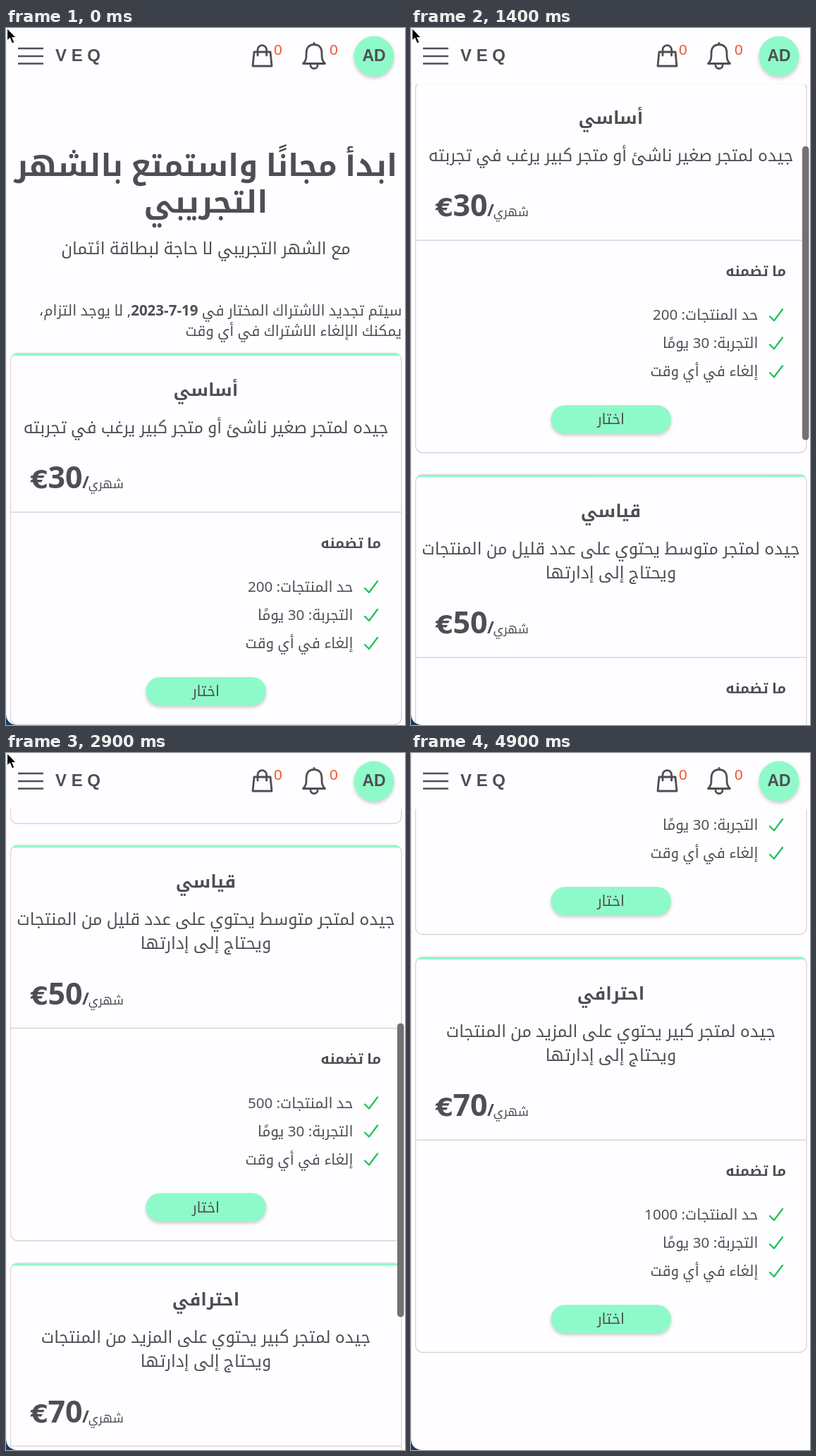
Write an HTML page that moves like this. It is 566 px wide and 989 px high and loops after 5 s.

```html
<!DOCTYPE html>
<html lang="ar">
<head>
<meta charset="utf-8">
<style>
  html, body { margin: 0; width: 100%; height: 100%; overflow: hidden; background: #fefdff; }
  svg { display: block; width: 566px; height: 989px; }
  text { font-family: "Noto Sans", "Noto Kufi Arabic", "Noto Sans Arabic", "DejaVu Sans", sans-serif; fill: #504e53; white-space: pre; }
  .rtl { direction: rtl; }
  .mid { text-anchor: middle; }
  .b { font-weight: 700; }
  .latin { font-family: "Liberation Sans", Arial, sans-serif; }
  .euro { font-family: "DejaVu Sans", sans-serif; }
  .red { fill: #f4512c; }
  .icon { fill: none; stroke: #504e53; stroke-width: 2.8; stroke-linejoin: round; stroke-linecap: round; }
  .tick { fill: none; stroke: #1fc45c; stroke-width: 2.3; stroke-linecap: round; stroke-linejoin: round; }
  .green { fill: #8ffac9; }
  .shadow { filter: drop-shadow(0 3px 2.5px rgba(0, 0, 0, .2)); }
</style>
</head>
<body>
<svg viewBox="0 0 566 989">
  <g id="page"></g>
  <rect width="566" height="79.5" fill="#fefdff"/>
  <path d="M17 29H53M17 40H53M17 50.5H53" stroke="#504e53" stroke-width="2.3"/>
  <text class="latin b" x="70" y="47" font-size="24">V E Q</text>
  <path class="icon" d="M352 34H375L377 54H350ZM357 39V31a6.3 6.3 0 0 1 12.6 0V39"/>
  <text class="latin red" x="380" y="38" font-size="21">0</text>
  <path class="icon" d="M421.5 50.5C426 46 426 43 426 36C426 28 430 23.5 437 23.5S448 28 448 36C448 43 448 46 452.5 50.5ZM437 23V21.5M432 53a5 4.5 0 0 0 10 0"/>
  <text class="latin red" x="459" y="38" font-size="21">0</text>
  <circle class="green shadow" cx="522" cy="40" r="28.5"/>
  <text class="latin b mid" x="522" y="47" font-size="23">AD</text>
  <rect id="thumb" x="555" width="9.5" height="417" rx="4.75" fill="#737173"/>
  <path d="M.5 0V989" stroke="#e9e7eb"/>
  <path d="M0 974Q1 987 14 989H0Z" fill="#1d3a63"/>
  <path id="cursor" d="M1.5 0V18L5.5 14.5L8.5 22L12 20.5L9 13.5H14.5Z" fill="#000" stroke="#fff" stroke-width="1.2"/>
</svg>
<script>
const $ = id => document.getElementById(id);
const LOOP = 5000;

const text = (s, x, y, size, cls = '') =>
  `<text class="${cls}" x="${x}" y="${y}" font-size="${size}">${s}</text>`;
const center = (s, y, size, cls = '') => text(s, 283.5, y, size, 'rtl mid ' + cls);

function card(top, title, lines, price, limit) {
  const rule = top + 191 + 34 * lines.length;
  const items = [`حد المنتجات: ${limit}`, 'التجربة: 30 يومًا', 'إلغاء في أي وقت'];
  return `<rect x="6.5" y="${top - .5}" width="554.5" height="${rule + 302 - top}" rx="10" fill="none" stroke="#d8d6da" stroke-width="1.3"/>
    <path class="green" d="M8 ${top + 3}Q10 ${top} 15 ${top}H553Q558 ${top} 560 ${top + 3}Z"/>
    <path d="M7 ${rule}H561" stroke="#d8d6da" stroke-width="1.3"/>` +
    center(title, top + 59.5, 24.6, 'b') +
    lines.map((s, i) => center(s, top + 112.5 + 34 * i, 23.6)).join('') +
    text('€', 35, rule - 34, 36, 'euro b') +
    text(price, 59.5, rule - 34, 43, 'b') +
    text('/', 108, rule - 34, 24, 'b') +
    text('شهري', 167, rule - 34, 17.5, 'rtl') +
    text('ما تضمنه', 532, rule + 50.5, 20.1, 'rtl b') +
    items.map((s, i) => {
      const y = rule + 113 + 40 * i;
      return text(s, 492.5, y, 20.6, 'rtl') +
        `<path class="tick" d="M509 ${y - 5}L515 ${y + 1}L527 ${y - 15}"/>`;
    }).join('') +
    `<rect class="green shadow" x="198.5" y="${rule + 234}" width="170.5" height="40" rx="20"/>` +
    center('اختار', rule + 261, 20.6);
}

$('page').innerHTML =
  center('ابدأ مجانًا واستمتع بالشهر', 210, 43.4, 'b') +
  center('التجريبي', 262, 43.4, 'b') +
  center('مع الشهر التجريبي لا حاجة لبطاقة ائتمان', 320.5, 23.6) +
  text('سيتم تجديد الاشتراك المختار في <tspan font-weight="600">19-7-2023</tspan>, لا يوجد التزام،', 561.5, 408, 20.5, 'rtl') +
  text('يمكنك الإلغاء الاشتراك في أي وقت', 561.5, 436.5, 20.5, 'rtl') +
  card(462, 'أساسي', ['جيده لمتجر صغير ناشئ أو متجر كبير يرغب في تجربته'], 30, 200) +
  card(1020, 'قياسي', ['جيده لمتجر متوسط يحتوي على عدد قليل من المنتجات', 'ويحتاج إلى إدارتها'], 50, 500) +
  card(1613, 'احترافي', ['جيده لمتجر كبير يحتوي على المزيد من المنتجات', 'ويحتاج إلى إدارتها'], 70, 1000);

// [time, scroll offset]
const path = [[0, 0], [900, 244.5], [1900, 527], [2500, 773], [2900, 888.5],
  [3600, 1299], [3700, 1309], [3900, 1320], [4200, 1323], [LOOP, 1323]];

function scrollAt(t) {
  const i = path.findIndex(p => p[0] > t);
  const [t0, s0] = path[i - 1], [t1, s1] = path[i];
  return s0 + (s1 - s0) * (t - t0) / (t1 - t0);
}

function draw() {
  const t = Math.floor(performance.now() % LOOP / 100) * 100;
  const s = scrollAt(t);
  $('page').setAttribute('transform', `translate(0 ${-s})`);
  $('thumb').setAttribute('y', 2.4 + .4288 * s);
  $('thumb').setAttribute('opacity', Math.max(0, Math.min(1, t / 200, (4400 - t) / 200)));
  $('cursor').setAttribute('visibility', t < 4000 ? 'visible' : 'hidden');
  requestAnimationFrame(draw);
}
draw();
</script>
</body>
</html>
```
